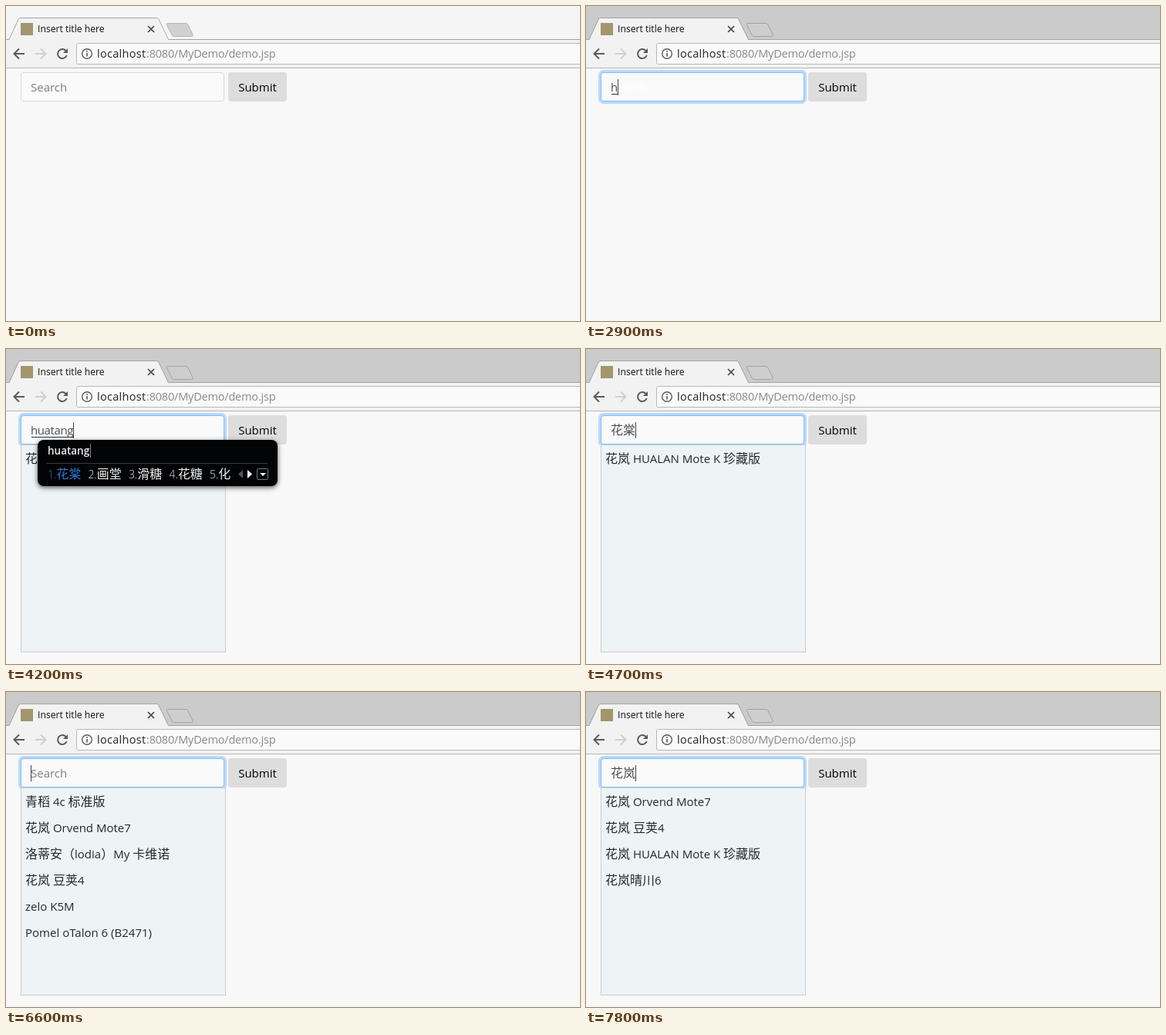
These frames come from a looping animation (744x409 px, 8 s). An HTML page:

```html
<!DOCTYPE html>
<html lang="en">
<head>
<meta charset="utf-8">
<title>Search suggestions</title>
<style>
html, body { margin: 0; width: 100%; height: 100%; overflow: hidden; }
body { position: relative; background: #f8f8f8; font: 15px "Open Sans", "Noto Sans CJK SC", "Noto Sans CJK", sans-serif; color: #24292e; }
body * { box-sizing: border-box; }
.abs, svg { position: absolute; white-space: pre; }
.cjk { font: 16px/0 "Noto Sans CJK SC", "Noto Sans CJK", sans-serif; }
#chrome { left: 0; top: 0; }
#strip { fill: #f5f5f5; }
#newTab { fill: #d0d0d0; stroke: #b4b4b4; }
.focus #strip { fill: #cbcbcb; }
.focus #newTab { fill: #cecece; stroke: #a2a2a2; }
#title { left: 41px; top: 20px; font-size: 12.2px; line-height: 20px; color: #111; }
.url { top: 52px; font-size: 14.5px; line-height: 20px; }
#field { left: 19px; top: 86px; width: 264px; height: 38px; border: 1px solid #d9d9d9; border-radius: 4px; background: #fafafa; }
.focus #field { border-color: #80bdff; box-shadow: 0 0 0 3px rgba(0, 123, 255, .25); }
.focus.soft #field { border-color: #a3cdf9; box-shadow: 0 0 0 3px rgba(0, 123, 255, .12); }
#hint, #typed { left: 12px; top: 0; line-height: 36px; color: #7b7f83; }
#typed { top: 4px; height: 28px; line-height: 28px; background: #fafafa; color: #495057; }
#typed.ime { letter-spacing: -.4px; }
#typed.ime::after { content: ""; position: absolute; left: 1px; right: 0; top: 23px; height: 1px; background: #333; }
#caret { top: 95px; width: 1px; height: 21px; background: #444; }
#submit { left: 288px; top: 86px; width: 76px; height: 38px; border-radius: 4px; background: #ddd; color: #000; line-height: 38px; text-align: center; }
#list { left: 19px; top: 124px; width: 266px; height: 270px; border: 1px solid #ccc; background: #eef3f5; padding-left: 5px; }
#list div { height: 34px; line-height: 34px; }
#ime { left: 41px; top: 118px; height: 60px; border-radius: 8px; background: #020305; box-shadow: 0 2px 6px rgba(0, 0, 0, .65); color: #eee; padding: 0 0 0 13px; }
#pinyin { left: 13px; top: 5px; font-size: 13.5px; font-weight: 600; line-height: 19px; padding-right: 1px; border-right: 1px solid #888; height: 18px; }
#rule { left: 11px; right: 13px; top: 30px; height: 1px; background: #3a3a3a; }
#words { left: 13px; top: 33px; line-height: 24px; font-size: 14px; font-weight: 300; }
#words span { display: inline-block; }
#words i { font: 300 16px/0 "Noto Sans CJK SC", "Noto Sans CJK", "DejaVu Sans", sans-serif; }
#words span:first-child { color: #2b7bd0; }
#arrows { right: 12px; top: 36px; }
#more { left: 101px; top: 7px; }
#moreText { left: 122px; top: 5px; font: 300 12px/19px "Noto Sans CJK SC", "Noto Sans CJK", sans-serif; color: #aaa; }
</style>
</head>
<body>
<svg id="chrome" width="744" height="82" fill="none">
  <path id="strip" d="M0 0H744V44H0Z"/>
  <path d="M0 44H744V80H0Z" fill="#f2f2f2"/>
  <path d="M0 43.5H4L16 17.5Q17 15.500 19 15.500H195Q197 15.500 198 17.500L210.500 43.500H744" stroke="#a3a3a3"/>
  <path d="M4.500 44L16.500 18Q17.500 16 19 16H195Q196.500 16 197.500 18L210 44Z" fill="#f2f2f2"/>
  <path id="newTab" d="M209.500 22.500H233Q235 22.500 236 24.500L242 37Q243 39.500 240.500 39.500H218Q216 39.500 215 37.500L208.500 24.500Q207.500 22.500 209.500 22.500Z"/>
  <path d="M0 80.500H744" stroke="#b6b6b6"/>
  <rect x="19" y="22" width="16" height="16" fill="#a3956c"/>
  <path d="M184 26L192 34M192 26L184 34" stroke="#444" stroke-width="1.700"/>
  <rect x="91.500" y="48.500" width="670" height="27" rx="2" fill="#fafafa" stroke="#b8b8b8"/>
  <g stroke-width="2">
    <path d="M24 62H11M17 55.500L10.500 62L17 68.500" stroke="#5a5a5a"/>
    <path d="M38 62H51M45 55.500L51.500 62L45 68.500" stroke="#d0d0d0"/>
    <path d="M77.500 58A6 6 0 1 0 78.700 64" stroke="#5a5a5a"/>
  </g>
  <path d="M80 55V61H74Z" fill="#5a5a5a"/>
  <circle cx="105" cy="62" r="6.300" stroke="#5a5a5a" stroke-width="1.400"/>
  <path d="M105 61V65.500M105 58V59.700" stroke="#5a5a5a" stroke-width="1.600"/>
</svg>
<div class="abs" id="title">Insert title here</div>
<div class="abs url" style="left:118px;letter-spacing:.3px;color:#222">localhost</div>
<div class="abs url" style="left:182px;letter-spacing:-.2px;color:#888">:8080/MyDemo/demo.jsp</div>
<div class="abs" id="field"><div class="abs" id="hint">Search</div><div class="abs" id="typed"></div></div>
<div class="abs" id="caret"></div>
<div class="abs" id="submit">Submit</div>
<div class="abs" id="list"></div>
<div class="abs" id="ime">
  <div class="abs" id="pinyin"></div>
  <svg id="more" width="16" height="16"><circle cx="7.500" cy="7.500" r="6.300" fill="#fff" stroke="#d9582f" stroke-width="1.600"/><path d="M7.500 6.500V11M7.500 3.800V5.300" stroke="#d9582f" stroke-width="2"/></svg>
  <div class="abs" id="moreText">6.更多特殊符号</div>
  <div class="abs" id="rule"></div>
  <div class="abs" id="words"></div>
  <svg id="arrows" width="40" height="18"><path d="M7 3V14L1 8.500Z" fill="#555"/><path d="M13 3V14L19 8.500Z" fill="#fff"/><rect x="25.500" y="1.500" width="14" height="14" rx="1" fill="none" stroke="#777"/><path d="M29 7H37L33 11Z" fill="#fff"/></svg>
</div>
<script>
const $ = id => document.getElementById(id);
const LOOP = 8000;
const deluxe = '花岚 HUALAN Mote K 珍藏版', orvend = '花岚 Orvend Mote7', pod = '花岚 豆荚4';
const one = [deluxe];
const brand = [orvend, pod, deluxe, '花岚晴川6'];
const all = ['青稻 4c 标准版', orvend, '洛蒂安（lodia）My 卡维诺', pod, 'zelo K5M', 'Pomel oTalon 6 (B2471)'];
const words = {
  h: '和 好 后 会 还',
  hu: '湖 虎 户 互 胡',
  hua: '化 话 画 花 ❀',
  huat: '画图 花坛 滑梯 画坛 话题',
  huata: '花塔 花坛 画坛 滑塌 花台',
  huatan: '花坛 画坛 花毯 滑坦 画摊',
  huatang: '花棠 画堂 滑糖 花糖 化',
  hual: '花岚 花篮 画廊 滑落 话里',
  hualan: '花岚 花篮 画栏 画廊里面 花兰'
};

// Each step lists only what changes from the one before.
const steps = [
  [0, { focus: '', text: '', caret: false, ime: false, more: 0, list: null }],
  [1100, { focus: 'focus soft', caret: true }],
  [1200, { focus: 'focus' }],
  [1500, { caret: false }],
  [2000, { caret: true }],
  [2500, { caret: false }],
  [2900, { text: 'h', caret: true }],
  [3000, { ime: true }],
  [3100, { text: 'hu' }],
  [3200, { text: 'hua', list: one }],
  [3400, { more: 1 }],
  [3500, { more: 2 }],
  [3700, { caret: false }],
  [3800, { text: 'huat', caret: true, more: 0 }],
  [3900, { text: 'huata' }],
  [4100, { text: 'huatan' }],
  [4200, { text: 'huatang' }],
  [4500, { text: '花棠', ime: false }],
  [4800, { list: [] }],
  [5200, { caret: false }],
  [5600, { caret: true }],
  [5800, { text: '花' }],
  [5900, { list: brand }],
  [6000, { text: '' }],
  [6100, { list: all, caret: false }],
  [6600, { caret: true }],
  [6700, { text: 'h' }],
  [6800, { text: 'hu', ime: true }],
  [6900, { text: 'hua', list: one, more: 2 }],
  [7200, { text: 'hual', more: 0 }],
  [7300, { text: 'hualan' }],
  [7700, { text: '花岚', ime: false }],
  [7800, { list: brand }]
];
let last = {};
const states = steps.map(([at, change]) => last = { ...last, ...change, at });

const mixed = s => s.replace(/[\u3000-\u9fff\uff00-\uffef]+/g, '<span class="cjk">$&</span>');
const show = (id, on) => $(id).style.visibility = on ? 'visible' : 'hidden';

function drawIme(s) {
  show('ime', s.ime);
  show('more', s.ime && s.more > 0);
  show('moreText', s.ime && s.more > 1);
  if (!s.ime) return;
  let sum = 0;
  $('pinyin').textContent = s.text;
  $('words').innerHTML = words[s.text].split(' ').map((w, i) => {
    const width = 20.5 + 16 * w.length;
    sum += width;
    return `<span style="width:${width}px">${i + 1}.<i>${w}</i></span>`;
  }).join('');
  $('ime').style.width = sum + 64.5 + 'px';
}

function draw(s) {
  const composing = /^[a-z]/.test(s.text);
  document.body.className = s.focus;
  $('typed').innerHTML = mixed(s.text);
  $('typed').className = composing ? 'abs ime' : 'abs';
  show('hint', !s.text || composing);
  $('hint').style.color = composing ? '#fff' : '';
  $('caret').style.left = 32 + Math.round($('typed').getBoundingClientRect().width) + 'px';
  show('caret', s.caret);
  show('list', s.list);
  $('list').innerHTML = (s.list || []).map(r => `<div>${mixed(r)}</div>`).join('');
  drawIme(s);
}

let shown;
function tick() {
  const t = performance.now() % LOOP;
  const s = states.findLast(x => x.at <= t);
  if (s !== shown) draw(shown = s);
  requestAnimationFrame(tick);
}
tick();
</script>
</body>
</html>
```
